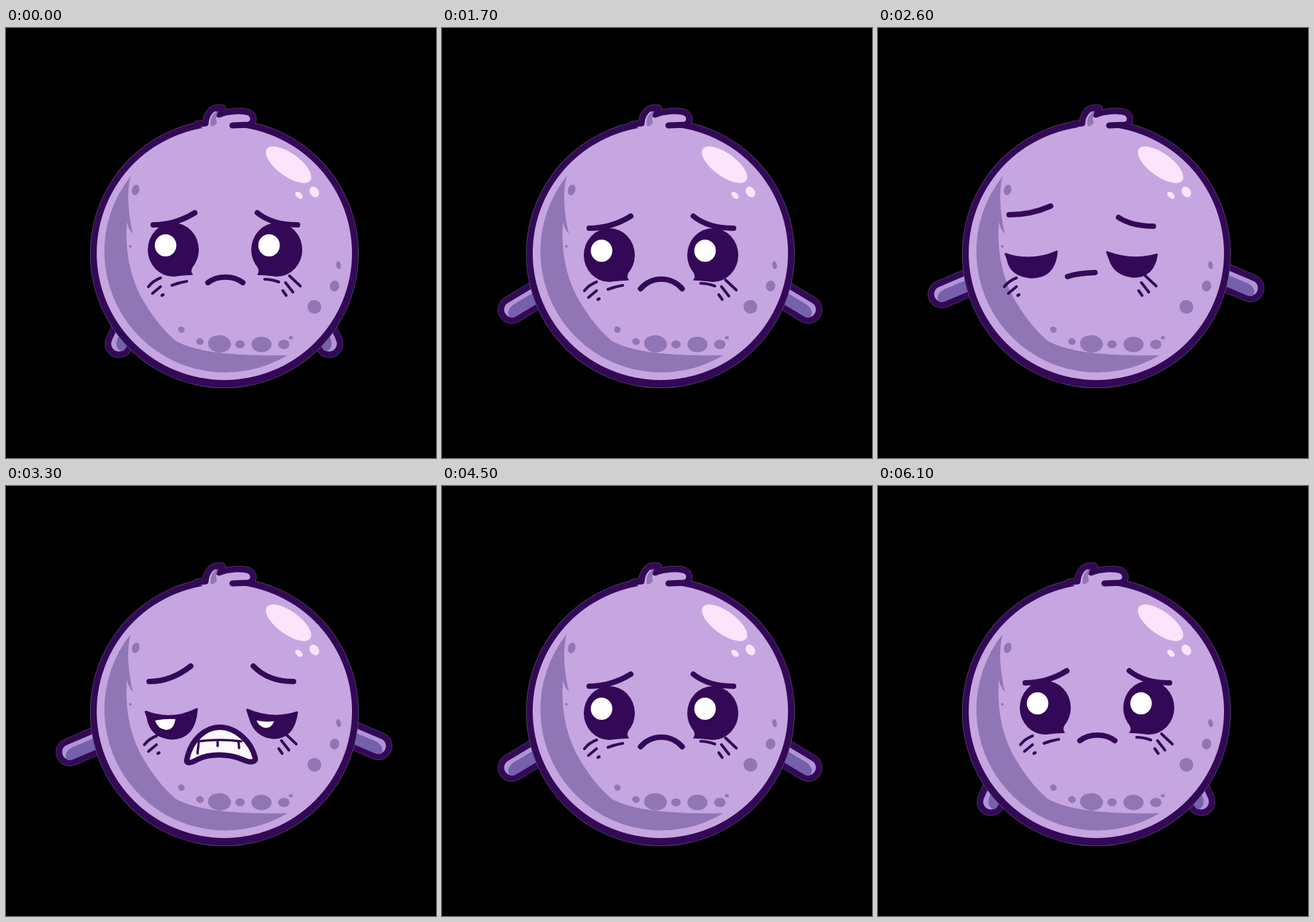
Write an HTML page with a canvas that moves like this. It is 640x640 px and loops after 6.2 s.

```html
<!DOCTYPE html>
<html lang="en">
<head>
<meta charset="utf-8">
<title>Sad purple ball</title>
<style>
html, body { margin: 0; height: 100%; overflow: hidden; background: #000; }
canvas { display: block; }
</style>
</head>
<body>
<canvas id="stage" width="640" height="640"></canvas>
<script>
const ctx = document.getElementById('stage').getContext('2d');
const INK = '#330957', SKIN = '#c6a6e0', SHADE = '#9176b5', SHINE = '#fbe5fc', RIM = '#5c596b';
const STEP = 100, COUNT = 62;

const ramp = (k, from, to) => Math.min(1, Math.max(0, (k - from) / (to - from)));

// The mood at one step, each part going from 0 to 1.
function moodAt(k) {
  const settle = ramp(k, 23, 26), grim = ramp(k, 26, 28);
  return {
    up: ramp(k, 5, 8),
    blink: Math.max(0, 1 - Math.abs(k - 9) / 3),
    look: ramp(k, 19, 22),
    hop: ramp(k, 21, 22) * (1 - settle),
    settle, grim,
    drowsy: settle * (1 - grim),
    tired: settle === 1
  };
}

function shape(d, fill, stroke, width) {
  const p = new Path2D(d);
  if (fill) { ctx.fillStyle = fill; ctx.fill(p); }
  if (stroke) { ctx.strokeStyle = stroke; ctx.lineWidth = width; ctx.stroke(p); }
}

function oval(x, y, rx, ry, fill, deg = 0) {
  ctx.beginPath();
  ctx.ellipse(x, y, rx, ry, deg * Math.PI / 180, 0, Math.PI * 2);
  ctx.fillStyle = fill;
  ctx.fill();
}

function group(draw) {
  ctx.save();
  draw();
  ctx.restore();
}

function scaleAt(x, y, sx, sy) {
  ctx.translate(x, y);
  ctx.scale(sx, sy);
  ctx.translate(-x, -y);
}

const ARM = 'M62,-16 L0,-16 A16,16 0 0 0 0,16 L62,16';
function arms({ up, hop, settle }) {
  const turn = 66 - 35 * up - 22 * hop - 8 * settle;
  for (const side of [1, -1]) group(() => {
    if (side < 0) { ctx.translate(649, -9 * settle); ctx.scale(-1, 1); }
    ctx.translate(168 - 64 * up - 16 * hop - 9 * settle, 470 - 51 * up - 43 * hop - 23 * settle);
    ctx.rotate(-turn * Math.PI / 180);
    shape(ARM, null, RIM, 10);
    shape(ARM, '#b094d6', INK, 9);
    shape('M60,-5 L6,-5 C-6,-4 -10,3 -8,9 Q-5,12 0,12 L60,12Z', '#7560ab');
  });
}

const HAIR = 'M284,143 L297,142 C298,128 306,116 322,119 C317,122 316,126 317,129 ' +
  'C330,124 350,122 362,126 C371,131 369,143 360,144 L337,145';
function hair({ hop, drowsy }, draw) {
  group(() => {
    ctx.translate(290 + 9 * hop + 7 * drowsy, 143);
    ctx.rotate(.1 * hop);
    ctx.translate(-290, -143);
    draw();
  });
}

function craters() {
  oval(193, 241, 5.5, 8, SHADE, 15);
  oval(185, 325, 2, 2, SHADE);
  oval(424, 461, 3, 2.5, SHADE);
  for (let i = 0; i < 6; i++) {
    const r = i && i % 2 === 0 ? 19 - i : 5 + i * .7;
    oval(261 + i * (27 + i * .7), 471 - 22 * .2 ** i, r, r * .7 + 1, SHADE, 35 * .4 ** i);
  }
  for (let i = 0; i < 3; i++) {
    oval(495 + i * (6 - 12 * i), 353 + i * 31, 3.5 + 3.5 * i, 6 + 2 * i, SHADE, 20 * i - 10);
  }
}

function body(m) {
  group(() => {
    scaleAt(325, 803, 1 - .014 * m.hop, 1 + .015 * m.hop);
    oval(325, 336, 200, 200, RIM);
    hair(m, () => shape(HAIR, null, RIM, 10));
    oval(325, 336, 199.3, 199.3, INK);
    oval(325, 335, 190, 189, SKIN);
    shape('M186,220 C179,240 182,280 189,306 Q183,301 180,289 C177,330 184,372 205,407 ' +
      'Q226,443 253,466 C290,486 360,488 419,487 A180,180 0 0 1 186,220Z', SHADE);
    craters();
    oval(420.5, 203.5, 40, 17, SHINE, 36);
    oval(459, 244, 6.5, 8.5, SHINE, -35);
    oval(436, 249, 4, 6.5, SHINE, -48);
    hair(m, () => {
      shape(HAIR + ' L334,154 L300,154Z', SKIN);
      shape(HAIR, null, INK, 9);
      shape('M305,146 Q302,130 316,123 Q311,134 314,141 Q310,147 305,146Z', SHADE);
    });
  });
}

function brows({ up, blink, look, settle, grim, drowsy }) {
  const out = 293 + 5 * up + 27 * blink - 10 * look - 10 * settle + 13 * grim;
  const inn = out - 18 + 9 * blink + 5 * settle - 10 * grim;
  const skew = 17 * drowsy;
  shape(`M219,${out} Q252,${out} 281,${inn}`, null, INK, 8);
  shape(`M${374 + 8 * drowsy},${inn + skew} Q${396 + 6 * drowsy},${out + skew} 434,${out + skew}`, null, INK, 8);
}

function openEyes({ up, blink, look, settle }) {
  const y = 330 + 8 * up + 21 * blink - 9 * look, r = 40 - 28 * blink - 16 * settle;
  for (const [x, side] of [[249, 1], [403, -1]]) {
    const low = y + r, edge = x + side * 29;
    oval(x, y, 38, r, INK);
    shape(`M${x},${low - 1} L${edge},${low - 3} Q${x + side * 24},${low - 7} ${edge},${y + r * .6}Z`, INK, INK, 1);
    if (r > 28) oval(x - 11.5, y - 6.5, 16, Math.min(16.5, r * .42), '#fff');
  }
}

function tiredEyes({ grim }) {
  group(() => {
    ctx.translate(6, 0);
    scaleAt(0, 337, 1, .88 + .12 * grim);
    shape('M208,336 Q246,351 284,332 Q281,376 246,376 Q215,373 211,345Z', INK, INK, 3);
    shape('M359,333 Q396,349 433,337 Q428,375 398,375 Q370,372 363,345Z', INK, INK, 3);
    if (grim) {
      shape('M222,349 Q238,346 252,347 Q250,363 238,363 Q225,361 222,349Z', '#fff');
      shape('M373,349 Q387,352 399,350 Q396,360 386,360 Q376,358 373,349Z', '#fff');
    }
  });
}

function lashes({ up, look, settle, tired }) {
  group(() => {
    ctx.translate(0, 6 * up - 9 * look + 3 * settle);
    shape('M212,385 Q219,376 230,372 M218,395 L230,385 M232,398 L234,397', null, INK, 4.2);
    shape('M412,391 L417,398 M416,379 L427,393 M422,369 L438,384', null, INK, 4.2);
    if (!tired) shape('M247,383 Q257,379 269,377 M385,374 Q395,374 406,378', null, INK, 4.2);
  });
}

function mouth({ up, look, settle, grim, tired }) {
  if (!tired) {
    const x = 326.5, y = 379 + 9 * up - 9 * look - 8 * settle;
    const w = 26 + 5 * up - 9 * settle, top = y - 11 - 8 * up + 14 * settle;
    shape(`M${x - w},${y} C${x - w * .45},${top} ${x + w * .45},${top} ${x + w},${y}`, null, INK, 8);
  } else if (!grim) {
    shape('M306,370 Q320,365 347,364', null, INK, 8);
  } else group(() => {
    ctx.translate(6, 0);
    scaleAt(320, 386, .6 + .4 * grim, .3 + .7 * grim);
    shape('M269,408 C275,376 298,359 318,359 C342,359 365,380 371,405 C372,412 362,412 352,407 ' +
      'C330,398 303,398 285,407 C276,412 268,414 269,408Z', '#fbf8fd', INK, 8);
    shape('M286,380 Q318,376 350,380 M287,380 L285,398 M315,379 L315,387 M346,380 L347,390', null, INK, 3.5);
  });
}

function draw(now) {
  const n = Math.floor(now / STEP) % COUNT;
  const m = moodAt(Math.min(n, COUNT - 1 - n)); // second half runs backwards
  ctx.fillStyle = '#000';
  ctx.fillRect(0, 0, 640, 640);
  ctx.lineCap = ctx.lineJoin = 'round';
  arms(m);
  body(m);
  group(() => {
    ctx.translate(-17 * m.look - 7 * m.settle + 18 * m.grim, 0);
    brows(m);
    (m.tired ? tiredEyes : openEyes)(m);
    lashes(m);
    mouth(m);
  });
}

const start = performance.now();
function tick() {
  draw(performance.now() - start);
  requestAnimationFrame(tick);
}
tick();
</script>
</body>
</html>
```
